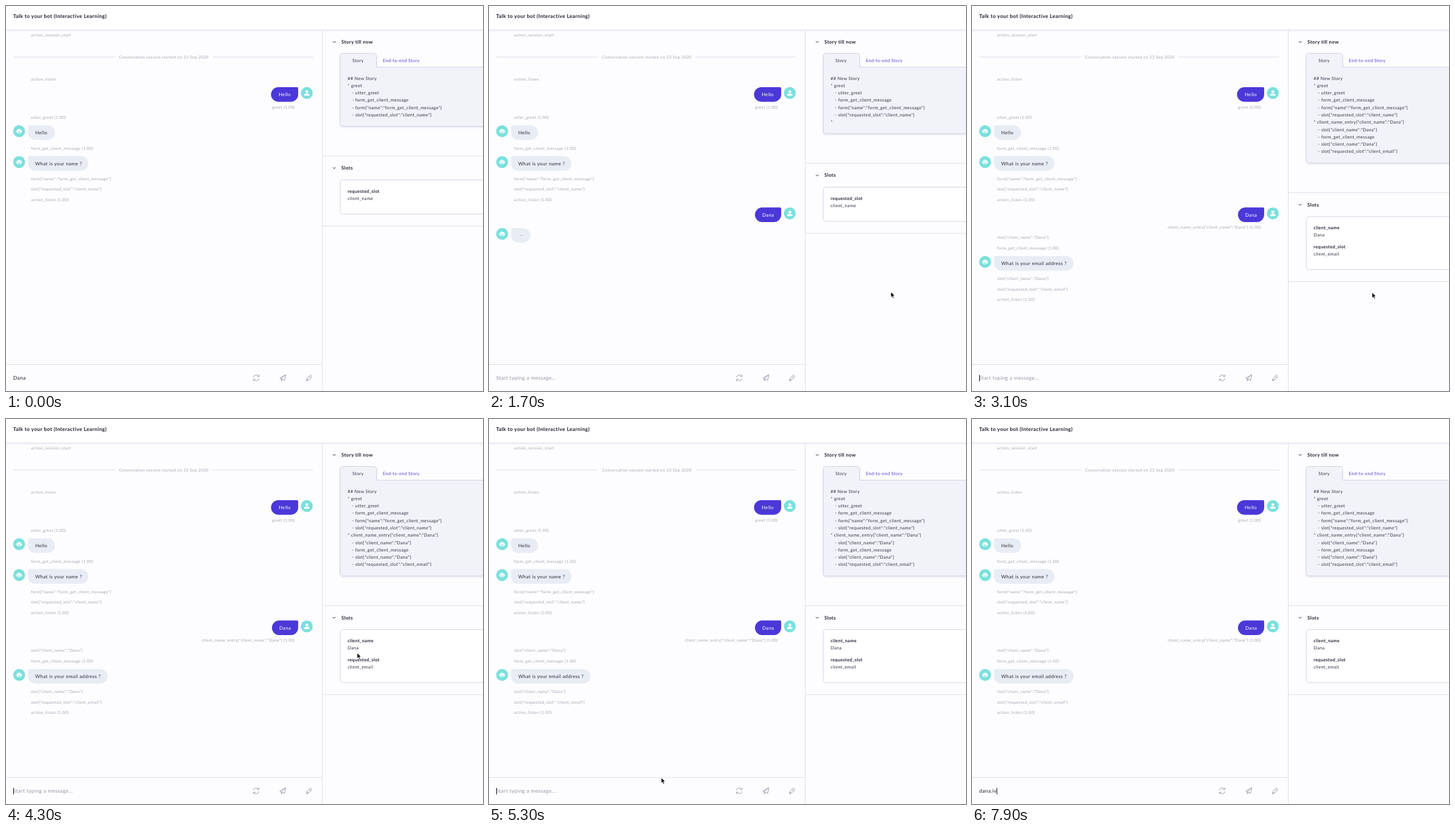
An HTML page that plays this animation: 800x645 px, repeating every 8000 ms.

```html
<!DOCTYPE html>
<html lang="en">
<head>
<meta charset="utf-8">
<title>Talk to your bot</title>
<style>
html, body { margin: 0; width: 100%; height: 100%; overflow: hidden; background: #fdfdff; }
svg { display: block; width: 800px; height: 645px; }
text { font: 7.38px Lato, sans-serif; letter-spacing: .37px; fill: #2a2d3e; text-rendering: geometricPrecision; }
.note { font-size: 6.77px; fill: #a0a3b2; }
.say { font-size: 8px; }
.mine { font-size: 8px; fill: #fff; }
.bold { font-weight: 700; fill: #1d2030; }
.head { font-size: 8.1px; font-weight: 700; fill: #1d2030; }
.title { font-size: 8.62px; font-weight: 700; fill: #1d2030; }
.input { font-size: 8.62px; fill: #1d2030; }
.hint { font-size: 8.62px; fill: #9194a5; }
.link { fill: #4f3fd6; }
.rule { stroke: #dcdeec; fill: none; }
.box { stroke: #d0d4e6; }
.icon { stroke: #8b8fa2; stroke-width: .85; fill: none; stroke-linejoin: round; stroke-linecap: round; }
</style>
</head>
<body>
<svg id="stage" viewBox="0 0 800 645">
  <defs>
    <linearGradient id="fade" x2="0" y2="1">
      <stop stop-color="#dfe0f0"/><stop offset="1" stop-color="#dfe0f0" stop-opacity="0"/>
    </linearGradient>
    <filter id="soft" x="-5%" y="-10%" width="110%" height="130%">
      <feDropShadow dx="0" dy="1.5" stdDeviation="1.5" flood-color="#8c92b8" flood-opacity=".25"/>
    </filter>
    <g id="bot">
      <circle r="10" fill="#7be0dc"/>
      <path d="M-.5-4.6h1v1.6h1.8q1.4 0 1.4 1.4v3.6q0 1.4-1.4 1.4h-4.6q-1.4 0-1.4-1.4v-3.6q0-1.4 1.4-1.4h1.8zM-5.2-1h.9v2.7h-.9zM4.3-1h.9v2.7h-.9z" fill="#fff"/>
      <path d="M-1.7-.7v.01M1.7-.7v.01M-1.5 1.7h3" stroke="#7be0dc" stroke-width="1.3" stroke-linecap="round"/>
    </g>
    <g id="user">
      <circle r="10" fill="#7be0dc"/>
      <circle cy="-2.2" r="2.4" fill="#fff"/>
      <path d="M-4.4 4.5v-1q0-2.6 2.6-2.6h3.6q2.6 0 2.6 2.6v1z" fill="#fff"/>
    </g>
  </defs>
  <rect width="800" height="40" fill="#fff"/>
  <rect y="39.5" width="800" height="3.5" fill="url(#fade)"/>
  <text class="title" x="12" y="20">Talk to your bot (Interactive Learning)</text>
  <path class="rule" d="M530.5 40V645M0 600.5H530"/>
  <path class="rule" d="M12 85.5H183M346 85.5H515"/>
  <g class="icon">
    <path d="M415 621.8a4.7 4.7 0 0 1 8.6-1.5M424.2 617.8v2.9h-2.9M424.3 624.2a4.7 4.7 0 0 1-8.6 1.5M415.1 628.2v-2.9h2.9"/>
    <path d="M468.8 618l-9.6 5.3 2.5 1.2 5.4 2.4zM468.8 618l-7.1 6.5v3.6l1.9-2.6"/>
    <path d="M504 627.7l1-4 5-5.2q.7-.6 1.4 0l1.2 1.1q.7.7.1 1.4l-4.8 5.1zM504.2 627.6l2.4-2.4M508.4 620.2l2.8 2.6"/>
  </g>
  <g id="live"></g>
</svg>
<script>
const LOOP = 8000, NAME = 'Dana', MAIL = 'dana.iv';
const keyTimes = [5800, 6100, 6200, 6300, 6700, 7100, 7900];
const pointerPath = [[900, 716, 470], [1700, 674, 479], [1900, 671, 480], [3500, 671, 480],
  [4300, 589, 392], [4500, 583, 387], [5300, 289, 601], [5800, 289, 601]];
const live = document.getElementById('live');
const pen = document.createElement('canvas').getContext('2d');

const text = (x, y, s, cls = '', anchor = 'start') =>
  `<text x="${x}" y="${y}" class="${cls}" text-anchor="${anchor}">${s}</text>`;
const note = (y, s) => text(42, y + 2.4, s, 'note');
const noteRight = (y, s) => text(484.8, y + 2.4, s, 'note', 'end');
const avatar = (kind, x, y) => `<use href="#${kind}" x="${x}" y="${y}"/>`;

function botSays(y, w, s) {
  return avatar('bot', 22, y + 9.8) +
    `<path d="M39 ${y}H${25 + w}a12.2 12.2 0 0 1 0 24.4H49.2a12.2 12.2 0 0 1-12.2-12.2V${y + 2}q0-2 2-2z" fill="#e8ecf5"/>` +
    text(49, y + 15, s, 'say');
}

function userSays(y, x, s) {
  return avatar('user', 504.5, y + 9.8) +
    `<path d="M${x + 12.2} ${y}H488q2 0 2 2V${y + 12.2}a12.2 12.2 0 0 1-12.2 12.2H${x + 12.2}a12.2 12.2 0 0 1 0-24.4z" fill="#4b38d8"/>` +
    text((x + 490.3) / 2, y + 15, s, 'mine', 'middle');
}

// Three dots pulsing one after another
function typingBubble(t) {
  let out = botSays(372, 32, '');
  for (let i = 0; i < 3; i++) {
    const age = t - 300 - i * 200, p = age % 1400 / 1400;
    const a = age < 0 ? 1 : p < .2 ? .2 + 4 * p : 1.2 - p;
    out += `<circle cx="${51.5 + i * 2.1}" cy="384.3" r=".65" fill="#2a2d3e" opacity="${a}"/>`;
  }
  return out;
}

function chat(t) {
  let out = note(48.5, 'action_session_start') +
    text(189.5, 88, 'Conversation session started on 23 Sep 2020', 'note') +
    note(122.5, 'action_listen') +
    userSays(136, 444.5, 'Hello') + noteRight(169.3, 'greet (1.00)') +
    note(186.4, 'utter_greet (1.00)') + botSays(200, 45, 'Hello') +
    note(238.2, 'form_get_client_message (1.00)') + botSays(251.6, 101, 'What is your name ?') +
    note(289.7, 'form{"name":"form_get_client_message"}') +
    note(307, 'slot{"requested_slot":"client_name"}') + note(324.2, 'action_listen (1.00)');
  if (t >= 100) out += userSays(337.6, 446, NAME);
  if (t >= 400 && t < 3100) out += typingBubble(t);
  if (t >= 3100) out += noteRight(370.8, `client_name_entry{"client_name":"${NAME}"} (1.00)`) +
    note(388, `slot{"client_name":"${NAME}"}`) + note(405.3, 'form_get_client_message (1.00)') +
    botSays(419, 133, 'What is your email address ?') +
    note(457, `slot{"client_name":"${NAME}"}`) +
    note(474.2, 'slot{"requested_slot":"client_email"}') + note(491.5, 'action_listen (1.00)');
  return out;
}

const heading = (y, s) => text(562.5, y + 2.9, s, 'head') +
  `<path d="M548.2 ${y - 1}l2.3 2.3 2.3-2.3" fill="none" stroke="#1d2030" stroke-width="1"/>`;

function panel(t) {
  const story = ['## New Story', '* greet', '- utter_greet', '- form_get_client_message',
    '- form{"name":"form_get_client_message"}', '- slot{"requested_slot":"client_name"}'];
  const done = t >= 3100;
  if (done) story.push(`* client_name_entry{"client_name":"${NAME}"}`, `- slot{"client_name":"${NAME}"}`,
    '- form_get_client_message', `- slot{"client_name":"${NAME}"}`, '- slot{"requested_slot":"client_email"}');
  else if (t >= 200) story.push('*');

  const shift = (story.length - 6) * 12.28, bottom = 201.5 + shift;
  const top = 291.3 + shift, height = done ? 89 : 57.3;
  const slots = done ? [['client_name', NAME], ['requested_slot', 'client_email']] : [['requested_slot', 'client_name']];
  let out = heading(60, 'Story till now') + heading(271.3 + shift, 'Slots') +
    `<path class="box" filter="url(#soft)" fill="#f2f3f9" d="M810 102.5H621.5V84.5q0-5-5-5H565.5q-5 0-5 5V${bottom - 5}q0 5 5 5H810z"/>` +
    text(581, 93.6, 'Story') + text(632, 93.6, 'End-to-end Story', 'link') +
    `<path class="rule" d="M531 ${251.3 + shift}H800M531 ${top + height + 20}H800"/>` +
    `<rect class="box" x="560.5" y="${top}" width="260" height="${height}" rx="5" fill="#fff"/>`;
  story.forEach((s, i) => out += text(s[0] == '-' ? 580.3 : 573, 123.6 + i * 12.28, s));
  slots.forEach(([k, v], i) => {
    const y = top + 21.2 + i * 32;
    out += text(573, y, k, 'bold') + text(573, y + 12.3, v);
  });
  return out;
}

function inputBar(t) {
  const typed = keyTimes.filter(k => k <= t);
  const s = t < 100 ? NAME : MAIL.slice(0, typed.length);
  const since = typed.length ? typed.at(-1) : 100;
  pen.font = '8.62px Lato, sans-serif';
  const x = 12 + (typed.length ? pen.measureText(s).width + s.length * .37 : 0);
  let out = s ? text(12, 626, s, 'input') : text(12, 626, 'Start typing a message...', 'hint');
  if (t >= 100 && (t - since) % 1000 < 500) out += `<rect x="${x}" y="618" width="1" height="11" fill="#111"/>`;
  return out;
}

function pointer(t) {
  const i = pointerPath.findIndex(([k], n) => k <= t && pointerPath[n + 1]?.[0] > t);
  if (i < 0) return '';
  const [a, b] = [pointerPath[i], pointerPath[i + 1]];
  const p = (t - a[0]) / (b[0] - a[0]), e = p * p * (3 - 2 * p);
  const at = n => a[n] + (b[n] - a[n]) * e;
  return `<path transform="translate(${at(1)} ${at(2)})" d="M0 0V9.2L2.1 7.2 3.6 10.6 5.2 9.9 3.7 6.6H6.6z" fill="#000" stroke="#fff" stroke-width=".7"/>`;
}

let shown = -1;
function draw(now) {
  const t = Math.floor(now % LOOP / 100) * 100;
  if (t != shown) live.innerHTML = chat(t) + panel(t) + inputBar(t) + pointer(t);
  shown = t;
  requestAnimationFrame(draw);
}
draw(0);
</script>
</body>
</html>
```
